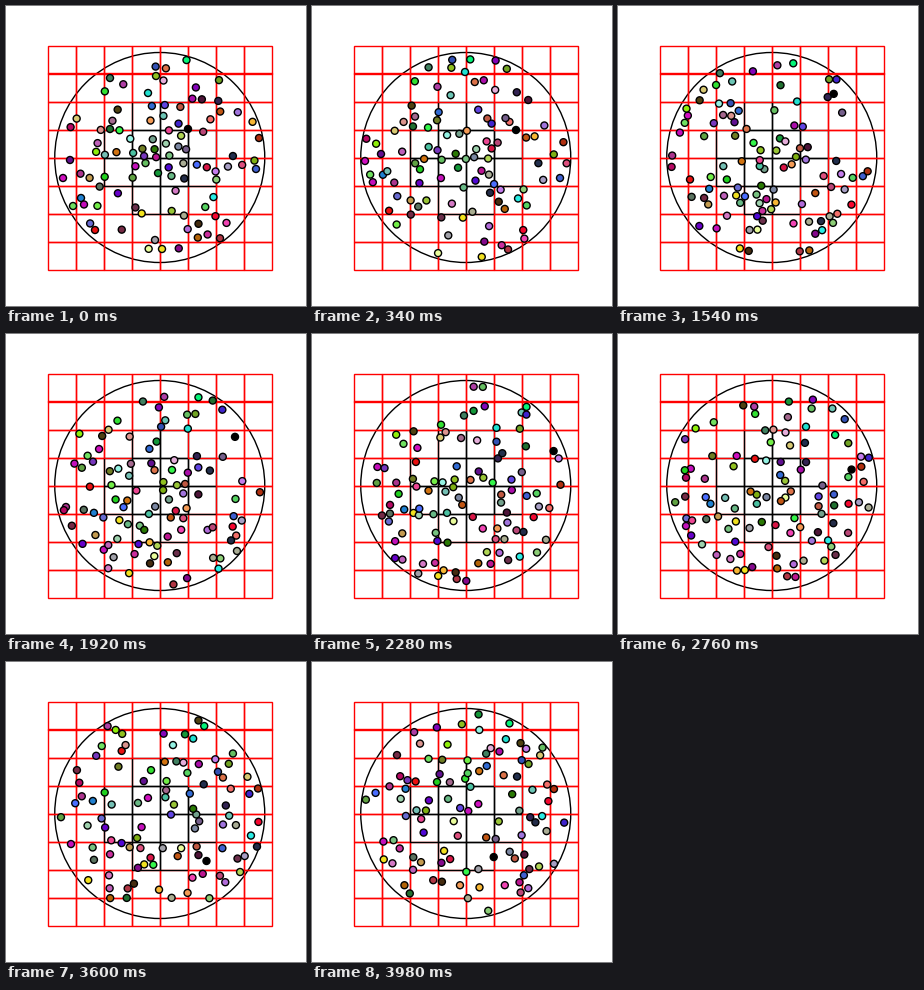
A matplotlib script that plays this animation: 300x300 px, repeating every 4 s.

```python
import numpy as np
import matplotlib.pyplot as plt
from matplotlib.animation import FuncAnimation
from matplotlib.patches import Circle, Rectangle

SIZE, DPI = 300, 100
FRAMES, INTERVAL = 200, 20
COUNT, RADIUS = 100, 3.5
CENTER, WALL = np.array([153.75, 151.5]), 105
CELL, LEFT, TOP = 28, 42, 40
MARKED = [  # x, y, dx, dy over 17 steps, colour
    (182, 123, 22, 1, "#000000"), (89, 224, -24, -39, "#e81010"),
    (57, 172, -4, -17, "#d010c0"), (250, 163, -2, 9, "#4060d0"),
    (75, 192, 2, -8, "#2080d0"), (156, 243, -6, -18, "#f0e020"),
    (150, 70, -1, -16, "#90c020"), (142, 87, 11, -21, "#20e0d0"),
    (253, 132, -2, 15, "#b03010"), (67, 200, -8, -30, "#70e060"),
    (104, 123, -6, -3, "#207030"), (149, 234, 11, 18, "#a0a0a8"),
    (64, 154, 5, -6, "#601090"), (104, 72, 7, -1, "#408060"),
]


def start(rng):
    """Scatter particles by radius and angle, without overlaps."""
    pos = [np.array(m[:2], float) for m in MARKED]
    vel = [np.array(m[2:4]) / 17 for m in MARKED]
    while len(pos) < COUNT:
        r, a = rng.uniform(0, WALL - RADIUS), rng.uniform(0, 2 * np.pi)
        p = CENTER + r * np.array([np.cos(a), np.sin(a)])
        if min(np.hypot(*(p - q)) for q in pos) > 2 * RADIUS:
            pos.append(p)
            vel.append(rng.normal(0, 1, 2))
    return np.array(pos), np.array(vel)


def collide(pos, vel):
    """Elastic bounces between equal masses and off the round wall."""
    gap = np.linalg.norm(pos[:, None] - pos[None], axis=2)
    for i, j in np.argwhere(np.triu(gap < 2 * RADIUS, 1)):
        n = (pos[i] - pos[j]) / gap[i, j]
        push = (vel[i] - vel[j]) @ n
        if push < 0:
            vel[i] -= push * n
            vel[j] += push * n
    out = pos - CENTER
    for i in np.flatnonzero(np.hypot(*out.T) > WALL - RADIUS):
        n = out[i] / np.hypot(*out[i])
        push = vel[i] @ n
        if push > 0:
            vel[i] -= 2 * push * n


def simulate(rng):
    pos, vel = start(rng)
    path = [pos.copy()]
    for _ in range(FRAMES - 1):
        pos += vel
        collide(pos, vel)
        path.append(pos.copy())
    return path


def draw_grid(ax):
    for col in range(8):
        for row in reversed(range(8)):
            x, y = LEFT + col * CELL, TOP + row * CELL
            far = np.hypot(max(abs(col - 4), abs(col - 3)),
                           max(abs(row - 4), abs(row - 3)))
            top = y - 1 if row == 1 else y
            ax.add_patch(Rectangle((x, top), CELL, y + CELL - top, fill=False,
                                   ec="red" if far > 2.5 else "black", lw=1))


rng = np.random.default_rng(7)
path = simulate(rng)
colors = [m[4] for m in MARKED] + [tuple(c) for c in rng.random((COUNT - len(MARKED), 3))]

fig = plt.figure(figsize=(SIZE / DPI, SIZE / DPI), dpi=DPI, facecolor="white")
ax = fig.add_axes([0, 0, 1, 1])
ax.set_xlim(0, SIZE)
ax.set_ylim(SIZE, 0)
ax.axis("off")
ax.add_patch(Circle(CENTER, WALL, fill=False, ec="black", lw=1))
draw_grid(ax)
dots = ax.scatter(*path[0].T, s=(2 * RADIUS * 72 / DPI) ** 2, c=colors,
                  edgecolors="black", linewidths=1, zorder=3)


def update(frame):
    dots.set_offsets(path[frame])
    return [dots]


anim = FuncAnimation(fig, update, frames=FRAMES, interval=INTERVAL,
                     repeat=True, repeat_delay=0)
plt.show()
```
